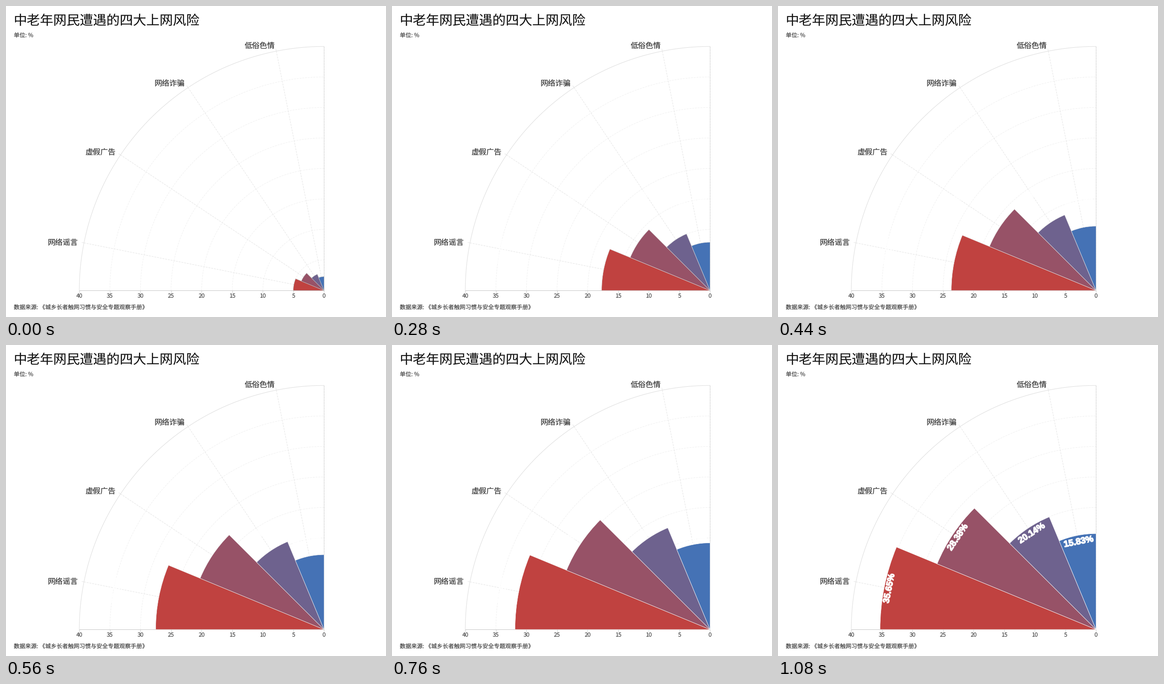
Recreate the animation shown at these times as a matplotlib script. Size 826 px wide and 678 px high, loop 3.08 s.

```python
import numpy as np
import matplotlib.pyplot as plt
from matplotlib.animation import FuncAnimation
from matplotlib.patches import Wedge
from matplotlib.patheffects import withStroke

W, H, DPI = 826, 678, 64
PX = 72 / DPI                      # points per pixel
CX, CY, R = 691.3, 620.2, 532.0
UNIT = R / 40
STEP = 22.5

ITEMS = [("网络谣言", 35.65), ("虚假广告", 28.38),
         ("网络诈骗", 20.14), ("低俗色情", 15.83)]
RED, BLUE = np.array([192, 66, 64]) / 255, np.array([69, 114, 181]) / 255

plt.rcParams["font.family"] = ["Noto Sans CJK JP"]
plt.rcParams["font.weight"] = "light"
plt.rcParams["text.hinting"] = "none"

fig = plt.figure(figsize=(W / DPI, H / DPI), dpi=DPI, facecolor="white")
ax = fig.add_axes([0, 0, 1, 1])
ax.set_xlim(0, W)
ax.set_ylim(H, 0)
ax.axis("off")


def polar(r, deg):
    """Point at radius r, deg measured upwards from the left half-axis."""
    a = np.radians(deg)
    return CX - r * np.cos(a), CY - r * np.sin(a)


def line(xs, ys, color, dashed=False, z=1):
    style = (0, (4, 2)) if dashed else "-"
    ax.plot(xs, ys, color=color, lw=PX, ls=style, zorder=z,
            dash_capstyle="butt", solid_capstyle="butt")


def spoke(r0, r1, deg, color, dashed=False):
    (x0, y0), (x1, y1) = polar(r0, deg), polar(r1, deg)
    line([x0, x1], [y0, y1], color, dashed)


def text(x, y, s, size, color="#4c4c4c", **kw):
    return ax.text(x, y, s, fontsize=size * PX, color=color,
                   va="baseline", **kw)


# Grid and axes
sweep = np.linspace(0, 90, 240)
for v in range(5, 40, 5):
    line(*polar(v * UNIT, sweep), "#f0f0f0", dashed=True)
line(*polar(R, sweep), "#dddddd")

for i in range(4):
    mid = (i + 0.5) * STEP
    spoke(0, R, mid, "#e4e4e4", dashed=True)
    spoke(R, R + 5, mid, "#e4e4e4")
spoke(0, R, 90, "#dddddd")
spoke(0, R, 90, "#cccccc", dashed=True)
spoke(0, R, 0, "#c4c4c4")

for v in range(0, 45, 5):
    x = CX - v * UNIT
    line([x, x], [CY, CY + 5], "#cccccc")
    text(x, 635.5, str(v), 12.4, ha="center")

# Captions
text(16.7, 41, "中老年网民遭遇的四大上网风险", 28.9, "#141414")
text(16.7, 67.7, "单位: %", 12.4)
text(16.7, 661.7, "数据来源: 《城乡长者触网习惯与安全专题观察手册》", 12.4)

# Sectors and their labels
sectors, labels = [], []
for i, (name, value) in enumerate(ITEMS):
    mid = (i + 0.5) * STEP
    x, y = polar(545, mid)
    text(x, y + 6.4, name, 16.5, "#383838", ha="right")

    color = RED + (BLUE - RED) * i / 3
    sector = Wedge((CX, CY), 1, 180 + i * STEP, 180 + (i + 1) * STEP,
                   facecolor=color, lw=0.75 * PX, zorder=3)
    sectors.append(ax.add_patch(sector))

    x, y = polar(value * UNIT - 21, mid)
    labels.append(text(x, y, f"{value:.2f}%", 19.3, "white", ha="center",
                       family="Liberation Sans", weight="bold",
                       rotation=90 - mid, rotation_mode="anchor", zorder=5,
                       path_effects=[withStroke(linewidth=1.6 * PX,
                                                foreground="white")]))

TIMES = [0, 160, 360, 560, 760, 920, 1080]
PHASE = [0.072, 0.198, 0.350, 0.520, 0.671, 0.772, 0.890]


def update(n):
    u = np.interp(n * 40, TIMES, PHASE)
    grow = 1 - (1 - u) ** 2        # quadratic ease-out
    for (_, value), sector, label in zip(ITEMS, sectors, labels):
        sector.set_radius(value * UNIT * grow + 1)
        sector.set_edgecolor([0.7 + 0.3 * grow] * 3)
        label.set_alpha(grow)
    return sectors + labels


anim = FuncAnimation(fig, update, frames=77, interval=40,
                     repeat=True, repeat_delay=0, blit=False)
plt.show()
```
